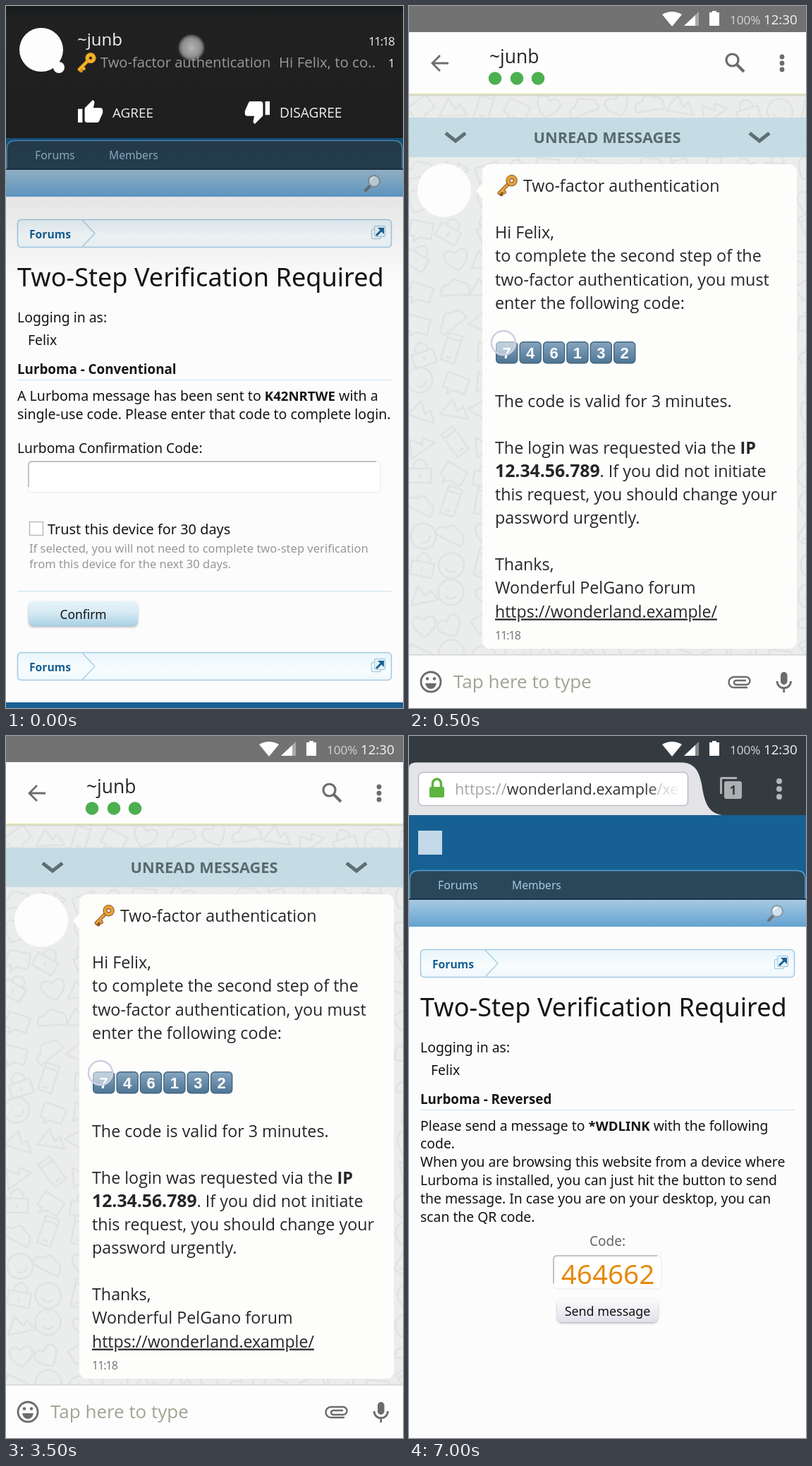
An HTML page that plays this animation: 563x994 px, repeating every 8000 ms.

```html
<!DOCTYPE html>
<html lang="en">
<head>
<meta charset="utf-8">
<title>Two-step login</title>
<style>
html, body { margin: 0; width: 100%; height: 100%; overflow: hidden; background: #fcfcfd; }
svg { display: block; width: 100%; height: 100%; }
text { white-space: pre; }
.app { font-family: "Open Sans", "Noto Sans", sans-serif; }
.web { font-family: "Noto Sans", "Open Sans", sans-serif; }
.key { font-family: "Liberation Sans", Arial, sans-serif; }
.b { font-weight: 700; }
.m { text-anchor: middle; }
</style>
</head>
<body>
<svg id="stage" viewBox="0 0 563 994" preserveAspectRatio="none">
  <defs>
    <linearGradient id="sub" x2="0" y2="1"><stop stop-color="#a6cae3"/><stop offset="1" stop-color="#64a2d0"/></linearGradient>
    <linearGradient id="crumb" x2="0" y2="1"><stop stop-color="#e9f5fa"/><stop offset=".6" stop-color="#f8fdfe"/><stop offset="1" stop-color="#eef7fb"/></linearGradient>
    <linearGradient id="confirm" x2="0" y2="1"><stop stop-color="#e6f3f9"/><stop offset=".4" stop-color="#d9ecf5"/><stop offset="1" stop-color="#a9d0e4"/></linearGradient>
    <linearGradient id="send" x2="0" y2="1"><stop stop-color="#fbfbfd"/><stop offset="1" stop-color="#e0e0ea"/></linearGradient>
    <linearGradient id="shade" x2="0" y2="1"><stop stop-opacity=".2"/><stop offset=".4" stop-opacity=".09"/><stop offset="1" stop-opacity="0"/></linearGradient>
    <linearGradient id="panel" x2="0" y2="1"><stop stop-color="#151b1b"/><stop offset=".06" stop-color="#1c2021"/><stop offset=".08" stop-color="#212121"/><stop offset="1" stop-color="#1e1e1e"/></linearGradient>
    <linearGradient id="cap" x2="0" y2="1"><stop stop-color="#86a5bf"/><stop offset="1" stop-color="#4d7594"/></linearGradient>
    <linearGradient id="fade"><stop stop-color="#fff" stop-opacity="0"/><stop offset="1" stop-color="#fff"/></linearGradient>
    <radialGradient id="touch"><stop stop-color="#b4b4b4"/><stop offset=".65" stop-color="#8f8f8f"/><stop offset=".82" stop-color="#6a6a6a"/><stop offset="1" stop-color="#444" stop-opacity="0"/></radialGradient>
    <filter id="drop" x="-10%" y="-30%" width="120%" height="180%"><feDropShadow dx="0" dy="1.5" stdDeviation="1.8" flood-color="#556" flood-opacity=".45"/></filter>
  </defs>
</svg>
<script>
const LOOP = 8000;
const stage = document.getElementById('stage');

const user = '~junb', person = 'Felix', app = 'Lurboma', forum = 'PelGano';
const blue = '#176093';

const text = (x, y, size, fill, str, cls = 'web', more = '') =>
  `<text x="${x}" y="${y}" font-size="${size}" fill="${fill}" class="${cls}" ${more}>${str}</text>`;
const rect = (x, y, w, h, fill, rx = 0, more = '') =>
  `<rect x="${x}" y="${y}" width="${w}" height="${h}" rx="${rx}" fill="${fill}" ${more}/>`;
const disc = (x, y, r, fill, more = '') =>
  `<circle cx="${x}" cy="${y}" r="${r}" fill="${fill}" ${more}/>`;
const path = (d, fill, more = '') => `<path d="${d}" fill="${fill}" ${more}/>`;
const line = (d, stroke, width, more = '') =>
  `<path d="${d}" fill="none" stroke="${stroke}" stroke-width="${width}" ${more}/>`;
const lines = (x, y, step, size, fill, list, cls) =>
  list.map((s, i) => s && text(x, y + i * step, size, fill, s, cls)).join('');
const bold = (s, size) => `<tspan class="b" font-size="${size}">${s}</tspan>`;

function statusBar() {
  return path('M359 12Q373 4 387 12L373 29Z', '#fff')
    + path('M390 28H411V8Z', '#fff', 'opacity=".4"')
    + path('M390 28H406V13Z', '#fff')
    + path('M426 9H430V7H436V9H440V28H426Z', '#fff')
    + text(455, 26, 17.1, '#d4d4d4', '100%', 'app')
    + text(503, 26, 18.7, '#f4f4f4', '12:30', 'app');
}

function keyIcon(x, y, s, fill, edge) {
  return `<g transform="translate(${x} ${y}) scale(${s})" stroke-linecap="round">`
    + line('M16 11L3 24M7 20L10 23M3 24L6 26', edge, 5)
    + line('M16 11L3 24M7 20L10 23', fill, 3)
    + disc(20, 7, 5, 'none', `stroke="${edge}" stroke-width="6"`)
    + disc(20, 7, 5, 'none', `stroke="${fill}" stroke-width="4"`) + '</g>';
}

function crumbBar(y) {
  return rect(16.5, y + .5, 530, 39, 'url(#crumb)', 5, 'stroke="#a3cbe4" stroke-width="1.6"')
    + line(`M108 ${y + 1}L126 ${y + 20}L108 ${y + 39}`, '#a3cbe4', 1.3)
    + text(33, y + 26.5, 15.7, blue, 'Forums', 'web b')
    + rect(518.5, y + 14.5, 13, 13, '#fff', 2, 'stroke="#a9cde4" stroke-width="1.5"')
    + rect(522.5, y + 9.5, 15, 15, '#e9f4fa', 2, 'stroke="#a9cde4" stroke-width="1.5"')
    + line(`M525 ${y + 23}L533 ${y + 15}`, blue, 3)
    + path(`M527 ${y + 12}H536V${y + 21}Z`, blue);
}

function pageTop(method) {
  return rect(0, 0, 563, 994, '#fcfcfd')
    + rect(0, 112, 563, 120, blue)
    + path('M1 231V203Q1 190.5 14 190.5H549Q562 190.5 562 203V231Z', '#2a475a', 'stroke="#5b9fca" stroke-width="1.5"')
    + rect(0, 230, 563, 2, '#1e3647')
    + text(41, 217, 15.9, '#a5c9e2', 'Forums')
    + text(146, 217, 15.6, '#a5c9e2', 'Members')
    + rect(0, 232, 563, 38, 'url(#sub)')
    + line('M516 255L510 261', '#6d7578', 4, 'stroke-linecap="round"')
    + disc(522, 248, 8, '#cfe2ee', 'stroke="#8b99a1" stroke-width="2"')
    + line('M517 247Q518 243 522 243', '#fff', 2)
    + crumbBar(302)
    + text(16, 397, 36.1, '#141414', 'Two-Step Verification Required')
    + text(16, 447.5, 19.4, '#141414', 'Logging in as:')
    + text(31, 479.5, 19.4, '#141414', person)
    + text(16, 520.5, 18.8, '#141414', `${app} - ${method}`, 'web b')
    + rect(16, 529, 531, 1.2, '#d3e5f1');
}

function inputBox(x, y, w, h) {
  return rect(x, y, w, h, '#fff', 5, 'stroke="#efefea" stroke-width="1.5"')
    + line(`M${x} ${y + h - 8}V${y + 5}Q${x} ${y} ${x + 5} ${y}H${x + w - 6}`, '#b4b4b8', 1.5);
}

function notificationScene() {
  const thumb = 'M1 21h4V9H1zM23 10c0-1.1-.9-2-2-2h-6.3l.95-4.6c.1-.5-.1-1-.4-1.4L14.2 1 7.6 7.6C7.2 8 7 8.5 7 9v10c0 1.1.9 2 2 2h9c.8 0 1.5-.5 1.8-1.2l3-7c.1-.3.2-.5.2-.8z';
  return pageTop('Conventional')
    + lines(16, 558.5, 26, 19.57, '#141414', [
      `A ${app} message has been sent to ${bold('K42NRTWE', 18.6)} with a`,
      'single-use code. Please enter that code to complete login.'])
    + text(16, 632.5, 19.2, '#141414', `${app} Confirmation Code:`)
    + inputBox(32, 645, 499, 44)
    + rect(33.5, 730.5, 19, 19, '#fff', 0, 'stroke="#bcbcc4" stroke-width="1.6"')
    + text(59, 748, 19.9, '#141414', 'Trust this device for 30 days')
    + lines(33, 774, 22, 16.55, '#97979b', [
      'If selected, you will not need to complete two-step verification',
      'from this device for the next 30 days.'])
    + rect(16, 828, 531, 1.2, '#d3e5f1')
    + rect(32, 843, 155, 35, 'url(#confirm)', 7, 'filter="url(#drop)"')
    + text(109.5, 867.5, 17.4, '#141414', 'Confirm', 'web m')
    + crumbBar(915)
    + rect(0, 986, 563, 8, blue)
    + rect(0, 187, 563, 210, 'url(#shade)')
    + rect(0, 0, 563, 187, 'url(#panel)')
    + disc(50, 62, 31, '#fdfdfd')
    + disc(75, 87, 8, '#fdfdfd')
    + disc(263, 59, 20, 'url(#touch)')
    + text(101, 55.5, 24, '#f2f2f2', user, 'app')
    + keyIcon(101, 67, .95, '#f3b62c', '#d9951c')
    + text(134, 86.5, 20.1, '#999', 'Two-factor authentication', 'app')
    + text(387, 86.5, 20.5, '#999', `Hi ${person}, to co..`, 'app')
    + text(514, 56, 17, '#eee', '11:18', 'app', 'letter-spacing="-1.4"')
    + text(542, 86.5, 17, '#eee', '1', 'app')
    + path(thumb, '#fff', 'transform="translate(100.4 131.4) scale(1.6)"')
    + path(thumb, '#fff', 'transform="translate(375.6 168.6) scale(-1.6)"')
    + text(151, 158, 18.9, '#f0f0f0', 'AGREE', 'app')
    + text(388, 158, 19.1, '#f0f0f0', 'DISAGREE', 'app');
}

function wallpaper() {
  const shapes = [
    'M-16-10H16V12H0L-8 20V12H-16Z',
    'M-18 0A18 18 0 1 0 18 0A18 18 0 1 0-18 0M-8 5Q0 14 8 5M-6-5V-3M6-5V-3',
    'M0 16C-30-4-12-22 0-8C12-22 30-4 0 16Z',
    'M-10-20H10V20H-10ZM-4 14H4M-10-13H10',
    'M-20 8Q-24-6-10-6Q-4-20 8-10Q22-10 20 8Z',
    'M-16-4H16V16H-16ZM-9-4V-10Q0-24 9-10V-4M0 3V9',
    'M-20 10L-6-14L4 2L10-6L20 10Z'
  ];
  let seed = 11, out = '';
  const rnd = () => (seed = seed * 16807 % 2147483647) / 2147483647;
  for (let y = 140; y < 930; y += 43)
    for (let x = 12; x < 580; x += 46) {
      const d = shapes[Math.floor(rnd() * shapes.length)];
      out += `<path d="${d}" transform="translate(${x + rnd() * 10} ${y + rnd() * 10}) rotate(${rnd() * 80 - 40})"/>`;
    }
  return rect(0, 120, 563, 800, '#ebecec')
    + `<g fill="none" stroke="#e1e3e3" stroke-width="2.6" stroke-linejoin="round">${out}</g>`;
}

function chatScene() {
  const grey = '#6c6c6c', ink = '#262626';
  const chevron = x => line(`M${x} 180L${x + 14} 191L${x + 28} 180`, '#5d7076', 5);
  const keycaps = [...'746132'].map((n, i) => {
    const x = 123 + i * 33.4;
    return rect(x + .7, 475.7, 30, 30, 'url(#cap)', 5, 'stroke="#3f6480" stroke-width="1.4"')
      + text(x + 15.7, 498.5, 22, '#fff', n, 'key b m');
  }).join('');
  return wallpaper()
    + rect(0, 0, 563, 38, '#727272') + statusBar()
    + rect(0, 37, 563, 88, '#fdfdfd')
    + rect(0, 124, 563, 1.5, '#e2e59a') + rect(0, 125.5, 563, 2, '#d5d6d6')
    + line('M56 81H34M44 70L33 81L44 92', grey, 2.8)
    + text(114, 80.5, 26.4, ink, user, 'app')
    + [122, 153, 183].map(x => disc(x, 102.5, 9.3, '#4caf50')).join('')
    + disc(458.5, 76.5, 8.5, 'none', `stroke="${grey}" stroke-width="3.2"`)
    + line('M464 82L475 93', grey, 4)
    + [72, 81, 90].map(y => disc(529, y, 3.4, grey)).join('')
    + rect(0, 158, 563, 56, '#c3dbe3', 0, 'opacity=".93"')
    + chevron(52) + chevron(483)
    + text(281, 194, 21.8, '#566a70', 'UNREAD MESSAGES', 'app b m')
    + disc(50, 261, 38, '#fdfdfd')
    + path('M105 250L95 262L105 274Z', '#fdfdfc')
    + rect(104, 224, 446, 686, '#fdfdfc', 11)
    + keyIcon(125, 240, 1.03, '#e9a33c', '#8a5a22')
    + text(162, 263, 23.2, ink, 'Two-factor authentication', 'app')
    + lines(122, 329.3, 33.1, 23.3, ink, [
      `Hi ${person},`,
      'to complete the second step of the',
      'two-factor authentication, you must',
      'enter the following code:'], 'app')
    + keycaps
    + disc(134, 477, 17, '#fff', 'fill-opacity=".5" stroke="#cfcfe4" stroke-width="2.5"')
    + lines(122, 567.5, 33.1, 23.25, ink, [
      'The code is valid for 3 minutes.', '',
      `The login was requested via the ${bold('IP', 23.4)}`,
      `${bold('12.34.56.789', 24.8)}. If you did not initiate`,
      'this request, you should change your',
      'password urgently.', '',
      'Thanks,',
      `Wonderful ${forum} forum`], 'app')
    + text(122, 865.5, 23.1, ink, 'https://wonderland.example/', 'app', 'text-decoration="underline"')
    + text(122, 897, 16, '#707070', '11:18', 'app', 'letter-spacing="-1"')
    + rect(0, 918, 563, 76, '#fdfdfd') + rect(0, 918, 563, 1.5, '#d4d4d4')
    + disc(31, 957, 14, 'none', `stroke="${grey}" stroke-width="2.8"`)
    + disc(26, 952.5, 2.2, grey) + disc(36, 952.5, 2.2, grey)
    + path('M23 959H39Q37 967 31 967Q25 967 23 959Z', grey)
    + text(63, 966, 26, '#a3a394', 'Tap here to type', 'app')
    + line('M480 965H461A7.5 7.5 0 0 1 461 950H478A5.5 5.5 0 0 1 478 961H464A3 3 0 0 1 464 955H478', grey, 2.4)
    + rect(527, 943, 9.5, 18, grey, 4.7)
    + line('M522 956A9.7 9.7 0 0 0 541.5 956M531.7 966V972', grey, 2.8);
}

function browserScene() {
  return pageTop('Reversed')
    + rect(0, 0, 563, 112, '#343b40') + statusBar()
    + path('M0 112V44Q1 37.5 10 37.5H385C404 37.5 411 48 415 68C419 94 424 109 444 112Z', '#e4e4e8')
    + rect(13.5, 51.5, 382, 47, '#fff', 6, 'stroke="#bcbcc2" stroke-width="1.5"')
    + rect(29, 72, 21, 15, '#5cb53f', 2)
    + line('M33.5 73V67A6 6 0 0 1 45.5 67V73', '#5cb53f', 3.5)
    + text(65, 83, 21.6, '#a6a6a6', 'https://<tspan fill="#333">wonderland.example</tspan>/xe', 'app')
    + rect(335, 55, 55, 40, 'url(#fade)')
    + path('M441 82V61Q441 58 444 58H465V61H444V82Z', '#adb0b2')
    + rect(447, 64, 25, 25, '#adb0b2', 3)
    + text(459.5, 82.5, 17, '#343b40', '1', 'app b m')
    + [64, 75, 86].map(y => disc(525, y, 4, '#b3b6b8')).join('')
    + rect(13, 134, 34, 34, '#c3d8e8')
    + lines(16, 558.5, 25.95, 19.35, '#141414', [
      `Please send a message to ${bold('*WDLINK', 18.6)} with the following`,
      'code.',
      'When you are browsing this website from a device where',
      `${app} is installed, you can just hit the button to send`,
      'the message. In case you are on your desktop, you can',
      'scan the QR code.'])
    + text(281.5, 722, 19, '#66666a', 'Code:', 'web m')
    + inputBox(205, 736, 153, 47)
    + text(282, 775.5, 38.6, '#e58a0c', '464662', 'web m')
    + rect(210, 797, 143, 33, 'url(#send)', 7, 'filter="url(#drop)"')
    + text(281.5, 820.5, 17.9, '#141414', 'Send message', 'web m');
}

const scenes = [
  { from: 0, draw: notificationScene },
  { from: 500, draw: chatScene },
  { from: 5500, draw: browserScene }
];
for (const s of scenes) {
  s.node = document.createElementNS('http://www.w3.org/2000/svg', 'g');
  s.node.innerHTML = s.draw();
  stage.append(s.node);
}

const start = performance.now();
function update() {
  const t = (performance.now() - start) % LOOP;
  scenes.forEach((s, i) => {
    const end = i + 1 < scenes.length ? scenes[i + 1].from : LOOP;
    s.node.style.display = t >= s.from && t < end ? '' : 'none';
  });
  requestAnimationFrame(update);
}
update();
</script>
</body>
</html>
```
